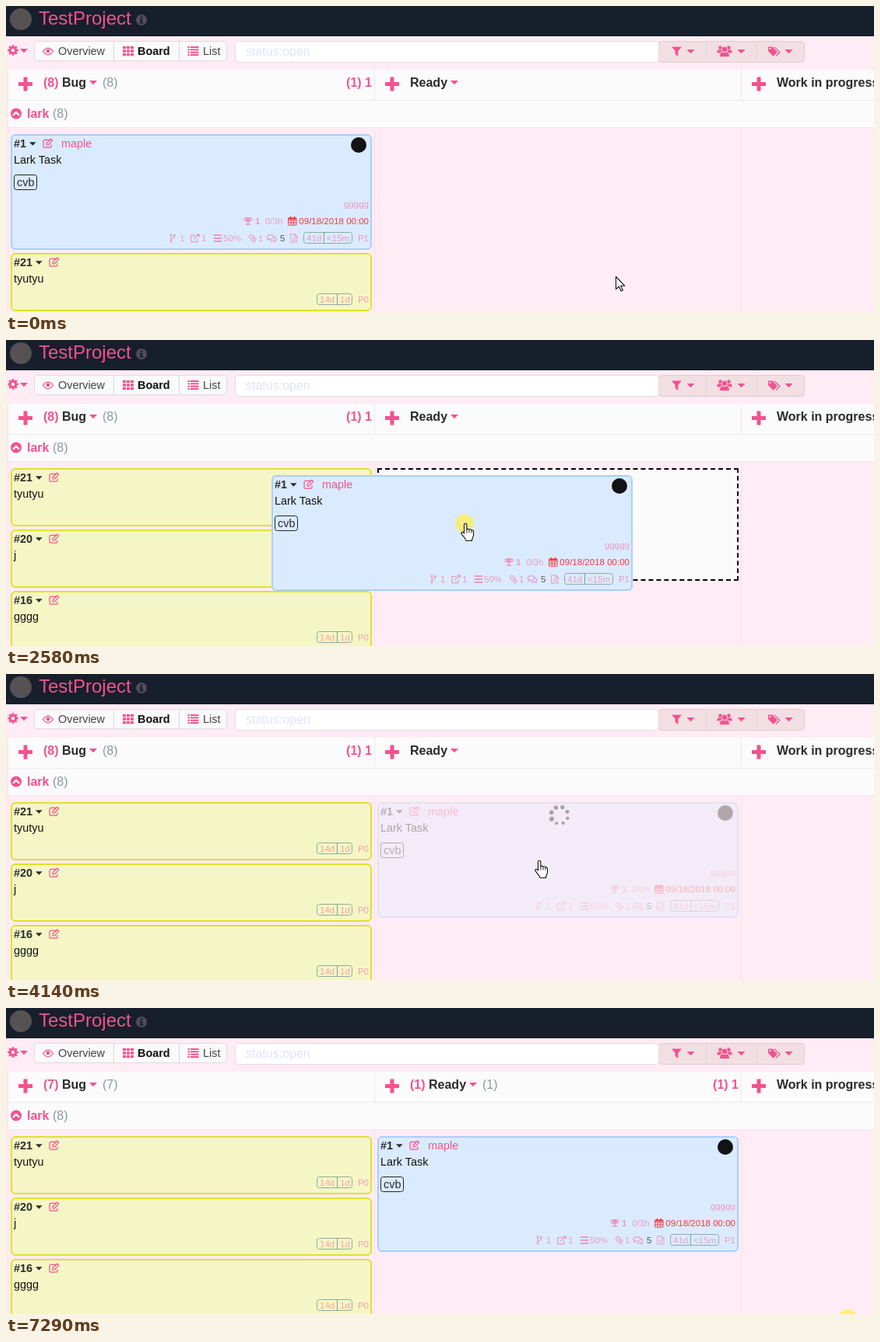
An HTML page that plays this animation: 1115x394 px, repeating every 7460 ms.

```html
<!DOCTYPE html>
<html lang="en">
<head>
<meta charset="utf-8">
<title>Task board</title>
<style>
html, body { margin: 0; width: 100%; height: 100%; overflow: hidden; background: #ffecf4; }
svg { display: block; }
text { font-family: "Liberation Sans", Arial, sans-serif; white-space: pre; }
.line { fill: none; stroke: currentColor; stroke-width: 1.2; stroke-linejoin: round; stroke-linecap: round; }
.slot { box-sizing: border-box; height: 145px; border: 2px dashed #000; background: #fafafa; }
</style>
</head>
<body>
<svg id="stage" width="1115" height="394" viewBox="0 0 1115 394"></svg>
<script>
const LOOP = 7460;
const PINK = '#f3528f', DARK = '#2b2b2b', GREY = '#8d979b', BUTTON = '#f2dfe4';
const BASE = 14.4, SMALL = 11.52, TABLE = 12.8;

const rect = (x, y, w, h, fill, more = '') =>
  `<rect x="${x}" y="${y}" width="${w}" height="${h}" fill="${fill}" ${more}/>`;
const text = (x, y, str, size, fill, more = '') =>
  `<text x="${x}" y="${y}" font-size="${size}" fill="${fill}" ${more}>${str}</text>`;
const BOLD = 'font-weight="700"';
const RIGHT = 'text-anchor="end"';
const dot = (x, y, r, fill, more = '') => `<circle cx="${x}" cy="${y}" r="${r}" fill="${fill}" ${more}/>`;
const path = d => `<path d="${d}"/>`;
const line = (d, more = '') => `<path class="line" d="${d}" ${more}/>`;
const group = (id, body) => `<g id="${id}">${body}</g>`;

// Icons are drawn around their own centre.
const grid = [-5, 0, 5].flatMap(x => [-4.5, 0, 4.5].map(y => rect(x - 2, y - 1.7, 4, 3.4, 'currentColor'))).join('');
const rows = [-5, -1.7, 1.7, 5].map(y =>
  rect(-7, y - 1, 2.4, 2, 'currentColor') + rect(-3.6, y - 1, 10.6, 2, 'currentColor')).join('');
const teeth = [...Array(8).keys()].map(i =>
  rect(-1.4, -6.7, 2.8, 2.6, 'currentColor', `transform="rotate(${i * 45})"`)).join('');
const person = (x, y, s) => `<g transform="translate(${x} ${y}) scale(${s})" stroke="${BUTTON}">` +
  path('M-6.6 7V4Q-6.6 0-3 0H3Q6.6 0 6.6 4V7Z') + dot(0, -3.4, 4, 'currentColor') + '</g>';
const icons = {
  plus: path('M-2.5-9h5v6.5H9v5H2.5V9h-5V2.5H-9v-5h6.5z'),
  caret: path('M-5-2.5H5L0 2.8z'),
  small: path('M-4.3-2H4.3L0 2.5z'),
  eye: line('M-6.6 0Q0-8.6 6.6 0Q0 8.6-6.6 0z') + dot(0, -.6, 2.4, 'currentColor'),
  grid, rows,
  gear: teeth + dot(0, 0, 3.7, 'none', 'stroke="currentColor" stroke-width="2.8"'),
  up: dot(0, 0, 7, 'currentColor') + line('M-3.4 1.6L0-1.8 3.4 1.6', 'style="stroke:#fff;stroke-width:2.2"'),
  info: dot(0, 0, 7, 'currentColor') + rect(-1.2, -4.6, 2.4, 2.2, '#161f2b') +
    '<path d="M-2-1.2H1.2V3H2.2V4.6H-2.2V3H-1.2V.4H-2z" fill="#161f2b"/>',
  filter: path('M-6.5-6h13L1.8-.6V6.4L-1.8 3.4V-.6z'),
  users: person(-5.4, -2, .68) + person(5.4, -2, .68) + person(0, 1, .95),
  tags: path('M-8-6h5.4L4 .8-1.4 6.2-8-.6z') + line('M0-5.6L7 1 2.4 5.8') + dot(-5.6, -3.6, 1.2, BUTTON),
  edit: line('M2.6-4.6H-4Q-6-4.6-6-2.8V3.4Q-6 5.2-4 5.2H2Q4 5.2 4 3.4V1.8') +
    line('M-2 2V-.2L3.8-5.8 5.8-3.8.2 2z'),
  trophy: path('M-3-5H3V-2Q3 1 .8 1.6V3.2H3V5H-3V3.2H-.8V1.6Q-3 1-3-2z') +
    line('M-3-3.6H-5Q-5 0-2.4 0M3-3.6H5Q5 0 2.4 0'),
  calendar: line('M-5-4H5V5.2H-5zM-5-1H5M-5 2H5M-1.7-1V5M1.7-1V5', 'style="stroke-width:.9"') +
    rect(-5, -4.2, 10, 2, 'currentColor') + rect(-3.2, -6, 1.6, 3, 'currentColor') + rect(1.6, -6, 1.6, 3, 'currentColor'),
  fork: line('M-2-4V4M2.4-3.5Q2.4 0-2 1.5') + dot(-2, -4, 1.4, 'currentColor') +
    dot(-2, 4, 1.4, 'currentColor') + dot(2.4, -3.6, 1.4, 'currentColor'),
  link: line('M0-3.4H-5.4V4.6H2.8V1') + line('M-1.4 .8L4-4.4') + path('M1-5.6H5.8V-.8z'),
  bars: [-4, 0, 4].map(y => rect(-5.2, y - 1, 10.4, 2, 'currentColor')).join(''),
  clip: line('M-1-1.4L2.4 2Q3.6 3.4 2.6 4.2T.4 3.8L-4-.6Q-5.4-2.4-4-3.8T-.6-3.8L4.4 1.2'),
  chat: line('M-1.4-4.4C3.8-4.4 4-.4 1 .8-.6 1.6-2.2 1.4-3 1.2L-5.4 2.2-4.4.4C-7-1-5.6-4.4-1.4-4.4z') +
    line('M4-2C7 0 6 2.4 4.6 3L5.4 4.8 2.8 3.6C.8 4-.6 3.4-1 3'),
  file: line('M-4-5.2H1.4L4-2.6V5.2H-4zM1-5V-2.2H4M-2 .2H2M-2 2.6H2', 'style="stroke-width:1"'),
  box: line('M-4.5-4.5H4.5V4.5H-4.5z', 'style="stroke-width:1"'),
  checked: line('M3.6 0V4.5H-5V-4.2H2.6') + line('M-2.6-.6L0 2 5.4-3.8', 'style="stroke-width:1.8"')
};
const icon = (name, x, y, color = PINK, more = '') =>
  `<g transform="translate(${x} ${y})" style="color:${color}" fill="${color}" ${more}>${icons[name]}</g>`;

function badge(x, y, parts) {
  const w = parts.reduce((sum, p) => sum + p[1], 0);
  let out = rect(x + .5, y + .5, w, 14, 'none', 'rx="3" stroke="#7f9f96" stroke-opacity=".85"');
  parts.forEach(([str, width], i) => {
    if (i) out += `<path d="M${x + .5} ${y + .5}v14" stroke="#7f9f96"/>`;
    out += text(x + 4, y + 12, str, SMALL, PINK, 'opacity=".5"');
    x += width;
  });
  return out;
}

function cardTop(id, title, h, fill, edge) {
  const w = id.length * 8.01;
  return rect(1, 1, 462, h - 2, fill, `rx="5" stroke="${edge}" stroke-width="2"`) +
    text(4, 17, id, BASE, DARK, BOLD) + icon('small', w + 12.3, 12.3, DARK) +
    icon('edit', w + 32, 12) + text(4, 38, title, BASE, '#111');
}

function yellowCard(y, id, title) {
  return `<g transform="translate(6 ${y})">` + cardTop(id, title, 75, '#f5f6c5', '#dfe22d') +
    badge(393, 52, [['14d', 26], ['1d', 19]]) +
    text(460, 64, 'P0', SMALL, PINK, RIGHT + ' opacity=".5"') + '</g>';
}

function blueCard() {
  const faded = (x, y, str, more = '') => text(x, y, str, SMALL, PINK, 'opacity=".52" ' + more);
  const mark = (name, x, y) => icon(name, x, y, PINK, 'opacity=".52"');
  const rose = '#f4373f';
  let out = cardTop('#1', 'Lark Task', 149, '#dbebff', '#a9cffb') +
    text(65, 17, 'maple', BASE, PINK) + dot(447, 14, 10, '#131317') +
    rect(4.5, 52.5, 29, 19, 'none', 'rx="3" stroke="#222"') + text(8, 67, 'cvb', BASE, DARK) +
    faded(460, 94, 'ggggg', RIGHT) +
    mark('trophy', 305, 112) + faded(314, 116, '1', BOLD) + faded(327, 116, '0/3h') +
    icon('calendar', 362, 112, rose) + text(460, 116, '09/18/2018 00:00', SMALL, rose, RIGHT);
  for (const [name, x] of [['fork', 208], ['link', 237], ['bars', 266], ['clip', 311], ['chat', 335], ['file', 364]])
    out += mark(name, x, 134);
  for (const [x, str] of [[217, '1'], [245, '1'], [273, '50%'], [318, '1']]) out += faded(x, 138, str);
  out += text(346, 138, '5', SMALL, '#555') + badge(376, 126, [['41d', 26], ['&lt;15m', 36]]) +
    faded(460, 138, 'P1', RIGHT);
  return out;
}

function spinner() {
  let out = '';
  for (let i = 0; i < 8; i++) {
    const a = i * Math.PI / 4;
    out += dot(11 * Math.cos(a), 11 * Math.sin(a), 3 - i * .15, '#000');
  }
  return out;
}

function columnHead(x, name, count, total) {
  const widths = { Bug: 31, Ready: 48 };
  let left = x;
  let out = '';
  if (count) { out += text(left, 104, count, 16, PINK, BOLD); left += 24; }
  out += text(left, 104, name, 16, DARK, BOLD);
  left += widths[name] + 9;
  out += icon('caret', left, 98.5);
  if (count) out += text(left + 12, 104, count, 16, GREY);
  if (total) out += text(x + 422, 104, total, 16, PINK, BOLD + ' ' + RIGHT);
  return out;
}

function chrome() {
  const edge = 'stroke="#dddcdd" rx="4"';
  const rule = (x, y, h) => rect(x, y, 1, h, '#dcd5d9');
  return rect(0, 0, 1115, 394, '#ffecf4') + rect(0, 0, 1115, 39, '#161f2b') +
    dot(19, 17, 14, '#565253') + text(42, 24, 'TestProject', 24, PINK) + icon('info', 174, 18, '#514b5d') +
    icon('gear', 9, 57) + icon('caret', 23, 57.5) +
    rect(36.5, 45.5, 247, 25, '#fafafa', edge) + rule(138, 46, 24) + rule(222, 46, 24) +
    icon('eye', 54, 58.5) + text(67, 63, 'Overview', BASE, '#444') +
    icon('grid', 157, 58) + text(169, 63, 'Board', BASE, '#111', BOLD) +
    icon('rows', 240.5, 58) + text(253, 63, 'List', BASE, '#444') +
    rect(838.5, 45.5, 187, 27, BUTTON, 'stroke="#dfccd2" rx="4"') +
    rect(294.5, 45.5, 544, 27, '#fff', 'stroke="#e4dadf" rx="4"') +
    text(308, 64, 'status:open', 16, '#dfe5f6') + rule(899, 46, 27) + rule(964, 46, 27) +
    icon('filter', 861.5, 58.5) + icon('caret', 879.5, 58.5) +
    icon('users', 923, 58) + icon('caret', 944.5, 58.5) +
    icon('tags', 987, 58.5) + icon('caret', 1005.5, 58.5) +
    rect(3, 82, 1112, 74, '#fbfbfb') + rect(3, 121, 1112, 1, '#efebed') + rect(3, 156, 1112, 1, '#f3e6ec') +
    [473, 944].map(x => rect(x, 82, 1, 40, '#efe8eb') + rect(x, 157, 1, 237, '#f3e4ea')).join('') +
    rect(2, 82, 1, 312, '#f5e3ea') +
    [25, 496, 967].map(x => icon('plus', x, 100.5)).join('') + text(990, 104, 'Work in progress', 16, DARK, BOLD) +
    icon('up', 13, 138.5) + text(27, 144, 'lark', 16, PINK, BOLD) + text(60, 144, '(8)', 16, GREY);
}

function tooltip() {
  const grid = '#eeeeee', link = '#c2185b';
  let out = rect(264.5, 305.5, 611, 120, '#fff', 'rx="4" stroke="#ddd" filter="url(#shade)"') +
    rect(271, 311, 598, 28, '#fbfbfb') +
    [311, 339, 367].map(y => rect(271, y, 599, 1, grid)).join('') +
    [271, 689, 869].map(x => rect(x, 311, 1, 83, grid)).join('') +
    text(275, 330, 'Subtask', TABLE, PINK, BOLD) + text(693, 330, 'Assignee', TABLE, PINK, BOLD);
  [['box', 'lark', 'lark'], ['checked', 'lark 2', 'maple']].forEach(([mark, task, user], i) => {
    const y = 358 + i * 28;
    out += icon(mark, 282.5, y - 5) + text(294, y, task, TABLE, link, 'text-decoration="underline"') +
      text(693, y, user, TABLE, PINK);
  });
  return out;
}

const outline = 'fill="#fff" stroke="#111" stroke-width="1.1" stroke-linejoin="round"';
const arrow = `<path d="M.5.5V16.6l3.8-3.6 2.7 6 2.3-1-2.6-5.8h5z" ${outline}/>`;
const hand = `<path transform="translate(-6 0)" d="M4.5 13V2a1.7 1.7 0 0 1 3.4 0V8a1.6 1.6 0 0 1 3 .6a1.6 1.6 0 0 1 3 .8a1.5 1.5 0 0 1 2.6 1V15c0 3-2 4-2 7.5H7C6.5 19 3 17 .8 13a1.7 1.7 0 0 1 2.4-1.6z" ${outline}/>` +
  '<path d="M1.9 8V12.5M4.9 9V12.5M7.9 10V12.5" stroke="#111" stroke-width=".9"/>';

const stage = document.getElementById('stage');
stage.innerHTML =
  '<defs><filter id="shade"><feDropShadow dx="0" dy="4" stdDeviation="3" flood-color="#aaa"/></filter></defs>' +
  chrome() +
  group('before', columnHead(48, 'Bug', '(8)', '(1) 1') + columnHead(519, 'Ready')) +
  group('after', columnHead(48, 'Bug', '(7)') + columnHead(519, 'Ready', '(1)', '(1) 1')) +
  group('stack', yellowCard(165, '#21', 'tyutyu') + yellowCard(244, '#20', 'j') + yellowCard(323, '#16', 'gggg')) +
  group('slot', '<foreignObject x="477" y="165" width="464" height="145"><div class="slot"></div></foreignObject>') +
  group('card', blueCard() + group('spin', spinner())) +
  group('tip', tooltip()) +
  group('glow', dot(0, 0, 12, '#fff04a', 'opacity=".7"')) +
  group('arrow', arrow) + group('hand', hand);

const part = Object.fromEntries([...stage.querySelectorAll('g[id]')].map(g => [g.id, g]));
const show = (name, on) => { part[name].style.display = on ? '' : 'none'; };
const move = (name, x, y) => part[name].setAttribute('transform', `translate(${x} ${y})`);

// time, x, y, pointer (a: arrow, h: hand), pressed
const steps = [
  [0, 783, 348, 'a'], [170, 420, 262, 'h'], [330, 241, 229, 'h'],
  [690, 256, 252, 'h'], [850, 276, 287, 'h'], [1020, 284, 300, 'h'],
  [1530, 270, 262, 'h'], [1700, 255, 227, 'h'], [1870, 255, 227, 'h', 1],
  [2060, 540, 227, 'a', 1], [2220, 554, 228, 'a', 1], [2380, 570, 231, 'a', 1],
  [2580, 590, 236, 'h', 1], [2740, 603, 240, 'h', 1], [2900, 614, 242, 'h', 1],
  [3090, 668, 241, 'h', 1], [3260, 685, 240, 'h'],
  [4640, 705, 250, 'h'], [4820, 753, 279, 'h'], [5010, 900, 335, 'a'], [5180, 1090, 382, 'a'],
  [5340, 1130, 420, 'a'], [5700, 1095, 368, 'a'], [5880, 850, 296, 'h'], [6050, 655, 330, 'a'],
  [6220, 666, 352, 'a'], [6430, 745, 372, 'a'], [6600, 830, 387, 'a'],
  [6770, 930, 410, 'a'], [7290, 1082, 400, 'a', 1]
];
const LIFT = 2580, DROP = 3260, DONE = 4290;

function draw(t) {
  const [, x, y, pointer, pressed] = steps.findLast(s => s[0] <= t);
  const dragging = t >= LIFT && t < DROP;
  const loading = t >= DROP && t < DONE;
  show('before', t < DONE);
  show('after', t >= DONE);
  show('tip', t >= 1360 && t < 2380);
  show('slot', dragging);
  show('spin', loading);
  show('glow', pressed);
  show('arrow', pointer === 'a');
  show('hand', pointer === 'h');
  move('stack', 0, t < LIFT ? 153 : 0);
  if (dragging) move('card', x - 249, y - 62);
  else move('card', t < LIFT ? 6 : 477, 165);
  part.card.setAttribute('opacity', loading ? .32 : 1);
  const turn = Math.floor((t - DROP) / 170) * 31;
  part.spin.setAttribute('transform', `translate(234 17) rotate(${turn})`);
  move('glow', x - 1, y);
  move(pointer === 'a' ? 'arrow' : 'hand', x, y);
}

function tick() {
  draw(performance.now() % LOOP);
  requestAnimationFrame(tick);
}
tick();
</script>
</body>
</html>
```
